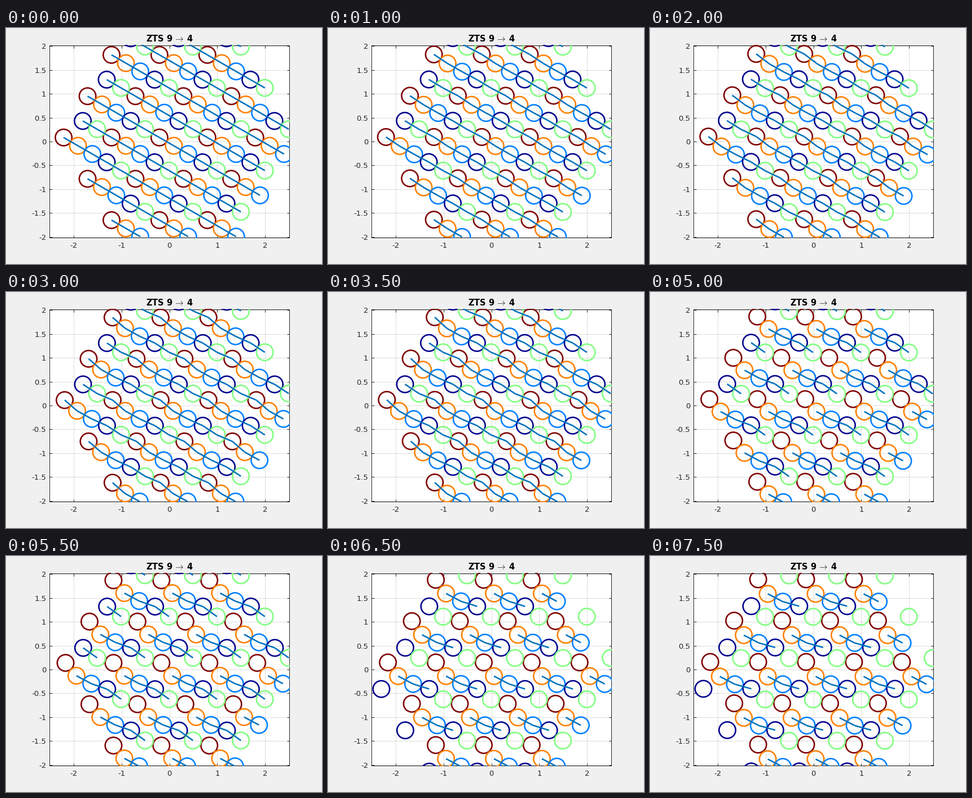
A matplotlib script for the animation above (8 s loop, 560x420 px).

```python
import itertools
import numpy as np
import matplotlib.pyplot as plt
from matplotlib.animation import FuncAnimation
from matplotlib.collections import LineCollection

W, H, DPI = 560, 420, 100
PX = 72 / DPI              # one pixel in points
UNIT = 84.9                # pixels per data unit
XMAX, YMAX = 2.5, 2.01
CX, CY = 289.55, 218       # axes centre, measured from the bottom left
STEPS, STEP_MS = 16, 500
INK = '#262626'

plt.rcParams['font.family'] = 'DejaVu Sans'
plt.rcParams['mathtext.fontset'] = 'cm'
plt.rcParams['axes.unicode_minus'] = False

# Hexagonal lattice patch
H3 = np.sqrt(3) / 2
CELLS = np.array([(i + j / 2, j * H3)
                  for i, j in itertools.product(range(-2, 3), repeat=2)
                  if abs(i + j) <= 2])

# Five disks per cell, in chain order, and their total drift
COLORS = ['#800000', '#ff8000', '#0080ff', '#00008f', '#80ff80']
RED, ORANGE, BLUE, NAVY, GREEN = range(5)
START = np.array([-0.208, 0.084]) + np.outer(range(5), [0.3, -H3 / 5])
START[[NAVY, GREEN]] += [-0.5, H3]
DRIFT = np.array([(0.055, 0.074), (-0.045, -0.057), (-0.03, -0.047),
                  (0.012, 0.031), (0.0, -0.018)])
WRAP_AT = 13               # navy re-enters on the opposite side

# (disk, next disk, step at which the bond breaks)
BONDS = [(RED, ORANGE, 10), (ORANGE, BLUE, STEPS), (BLUE, NAVY, STEPS),
         (NAVY, GREEN, 13), (GREEN, RED, 10)]
REACH = 0.39

fig = plt.figure(figsize=(W / DPI, H / DPI), dpi=DPI, facecolor='#f0f0f0')
ax = fig.add_axes([(CX - XMAX * UNIT) / W, (CY - YMAX * UNIT) / H,
                   2 * XMAX * UNIT / W, 2 * YMAX * UNIT / H])
ax.set(xlim=(-XMAX, XMAX), ylim=(-YMAX, YMAX),
       xticks=range(-2, 3), yticks=np.arange(-2, 2.1, 0.5))
ax.xaxis.set_major_formatter('{x:g}')
ax.yaxis.set_major_formatter('{x:g}')
ax.set_axisbelow(True)
ax.grid(color=INK, alpha=0.15, lw=PX)
ax.tick_params(direction='in', top=True, right=True, length=4.5 * PX,
               width=PX, color=INK, labelcolor=INK,
               labelsize=13.3 * PX, pad=6 * PX)
ax.tick_params(axis='x', pad=8.5 * PX)
for spine in ax.spines.values():
    spine.set(color=INK, linewidth=PX)
fig.text(CX / W, 396 / H, r'ZTS 9 $\!\rightarrow\!$ 4', ha='center',
         va='baseline', weight='bold', size=14.67 * PX, color='black')

disks = ax.scatter([], [], s=(29.4 * PX) ** 2, facecolors='none',
                   linewidths=2.6 * PX, zorder=3)
disks.set_edgecolors(np.repeat(COLORS, len(CELLS)))
bonds = LineCollection([], colors='#0072bd', linewidths=2.6 * PX, zorder=4)
ax.add_collection(bonds, autolim=False)
for art in (disks, bonds):
    art.set_clip_box(ax.bbox.padded(1.5))


def positions(step):
    base = START + DRIFT * step / (STEPS - 1)
    if step >= WRAP_AT:
        base[NAVY] -= [0.5, H3]
    return base[:, None] + CELLS


def draw(step):
    pts = positions(step)
    segments = []
    for a, b, end in BONDS:
        if step < end:
            gap = np.linalg.norm(pts[a][:, None] - pts[b], axis=2)
            segments += [(pts[a][i], pts[b][j])
                         for i, j in np.argwhere(gap < REACH)]
    disks.set_offsets(pts.reshape(-1, 2))
    bonds.set_segments(segments)
    return disks, bonds


anim = FuncAnimation(fig, draw, frames=STEPS, interval=STEP_MS,
                     repeat=True, repeat_delay=0)
plt.show()
```
